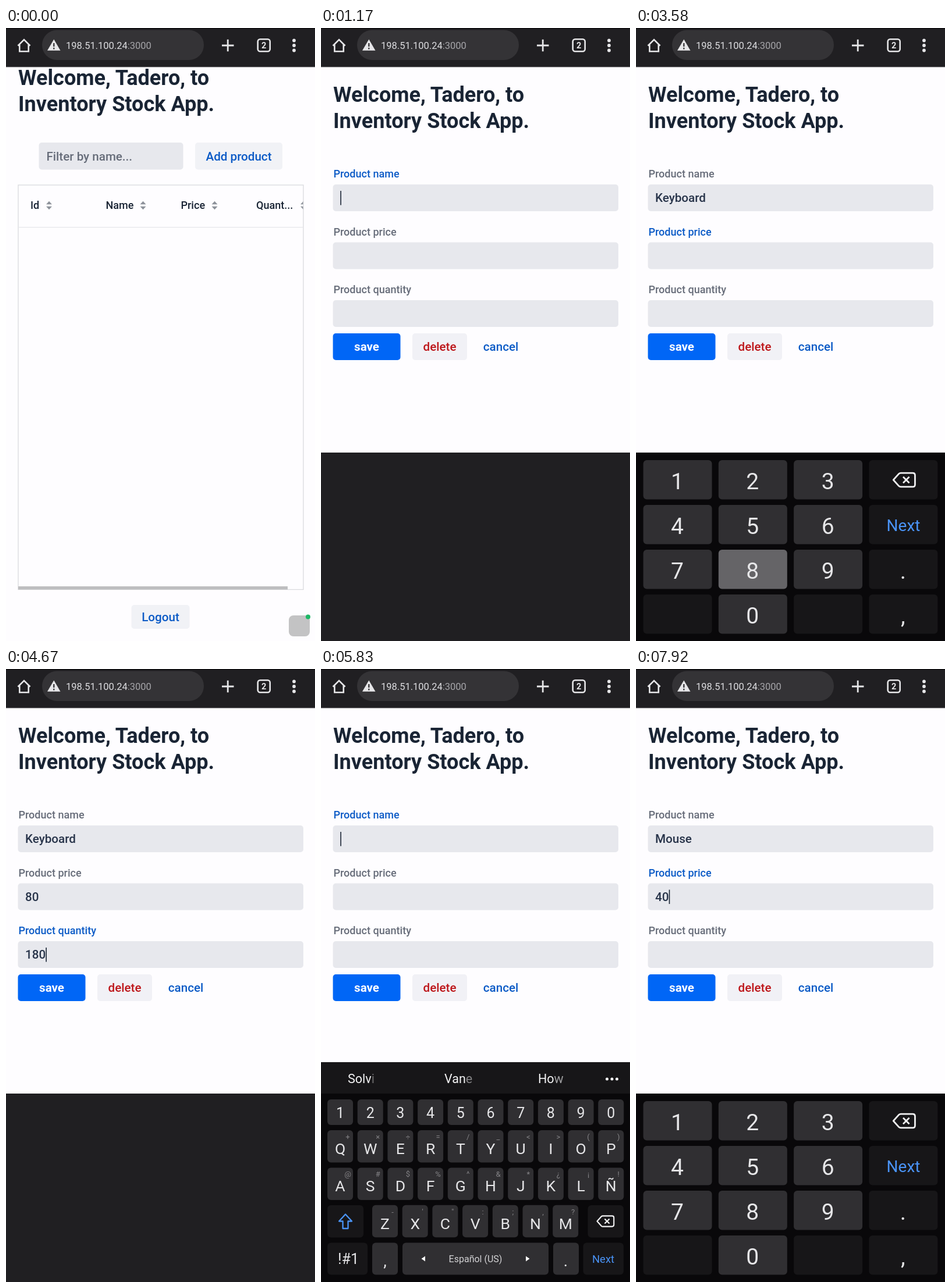
Animation of 531x1054 px, one loop 8000 ms. Source, as an HTML page:

```html
<!DOCTYPE html>
<html lang="en">
<head>
<meta charset="utf-8">
<title>Inventory Stock App</title>
<style>
html, body { margin: 0; width: 100%; height: 100%; overflow: hidden; background: #201f22; }
svg { display: block; width: 100vw; height: 100vh; font-family: Roboto, sans-serif; }
text { white-space: pre; }
</style>
</head>
<body>
<svg id="stage" viewBox="0 0 531 1054" preserveAspectRatio="none"></svg>
<script>
const LOOP = 8000;
const stage = document.getElementById('stage');
const INK = '#192434', BODY = '#28344a', MUTED = '#666c79', BLUE = '#0b5ac6';
const KEY = '#302f32', DARK = '#171618', DOWN = '#656467', BED = '#09080a', LIGHT = '#e6e6e8', LINK = '#4a94f8';

function add(parent, tag, attrs = {}, content) {
  const node = document.createElementNS('http://www.w3.org/2000/svg', tag);
  for (const name in attrs) node.setAttribute(name, attrs[name]);
  if (content !== undefined) node.textContent = content;
  parent.appendChild(node);
  return node;
}
const group = (parent, attrs) => add(parent, 'g', attrs);
const rect = (p, x, y, width, height, fill, rx = 0) => add(p, 'rect', { x, y, width, height, fill, rx });
const path = (p, d, attrs) => add(p, 'path', { d, fill: 'none', ...attrs });
const text = (p, x, y, size, fill, str, attrs) => add(p, 'text', { x, y, 'font-size': size, fill, ...attrs }, str);
const centred = (p, x, y, size, fill, str, weight = 400) =>
  text(p, x, y, size, fill, str, { 'text-anchor': 'middle', 'font-weight': weight });
const show = (node, on) => node.setAttribute('display', on ? 'inline' : 'none');
const clamp = v => Math.max(0, Math.min(1, v));

// Page
const page = group(stage);
rect(page, 0, 0, 531, 1054, '#fefdff');

const scroller = group(page);
const heading = (str, y) => text(scroller, 21, y, 36.1, INK, str, { 'font-weight': 700 });
heading('Welcome, Tadero, to', 127);
heading('Inventory Stock App.', 172);

const grid = group(scroller);
rect(grid, 56.5, 226, 248, 46.5, '#e7e8ed', 5);
text(grid, 69.5, 257, 20.6, MUTED, 'Filter by name...', { 'font-weight': 500 });
rect(grid, 325, 226, 150, 46.5, '#f1f2f6', 5);
centred(grid, 400, 257, 20.6, BLUE, 'Add product', 500);
add(grid, 'rect', { x: 21, y: 299, width: 490, height: 695.5, fill: 'none', stroke: '#d9dade', 'stroke-width': 1.3 });
rect(grid, 21, 371, 490, 1.3, '#e6e7eb');
const clip = add(add(stage, 'clipPath', { id: 'tableClip' }), 'rect', { x: 21, y: 299, width: 489.5, height: 696 });
const table = group(grid, { 'clip-path': 'url(#tableClip)' });
const columns = [42, 171.5, 300.5, 430];
['Id', 'Name', 'Price', 'Quant...'].forEach((title, i) => {
  text(table, columns[i], 340, 18.05, INK, title, { 'font-weight': 500 });
  const x = [74, 235.5, 358.5, 511][i];
  path(table, `M${x - 5} 332.3l5-5.5 5 5.5zM${x - 5} 335.7l5 5.5 5-5.5z`, { fill: '#8d929a' });
});
const row = group(table);
['73', 'Keyboard', '80', '180'].forEach((v, i) => text(row, columns[i], 401.5, 20.6, BODY, v));
rect(grid, 21, 989, 463, 5.5, '#bebec0');
rect(grid, 215.5, 1021, 100, 41, '#f1f2f6', 5);
centred(grid, 265.5, 1048.5, 20.6, BLUE, 'Logout', 500);

const badge = group(page);
rect(badge, 486, 1010, 36, 36, '#c3c3c4', 8);
add(badge, 'circle', { cx: 519, cy: 1012.5, r: 4, fill: '#1eb866' });

const form = group(scroller);
const fields = ['name', 'price', 'quantity'].map((id, i) => {
  const y = 269 + i * 99.5;
  const label = text(form, 21.5, y - 12, 18.05, MUTED, 'Product ' + id, { 'font-weight': 500 });
  rect(form, 20.5, y, 490.5, 46, '#e7e8ed', 5);
  const value = text(form, 33, y + 30.3, 20.6, BODY, '', { 'font-weight': 500 });
  return { id, y, label, value };
});
const underline = rect(form, 33.5, 302.5, 0, 1.3, BODY);
const caret = rect(form, 33, 280, 1.6, 24.5, INK);
rect(form, 20.5, 525, 116, 46, '#0066f6', 5);
centred(form, 78.5, 555, 20.6, '#fff', 'save', 700);
rect(form, 157, 525, 94, 46, '#f1f1f6', 5);
centred(form, 204, 555, 20.6, '#bd161a', 'delete', 500);
centred(form, 309, 555, 20.6, BLUE, 'cancel', 500);

// Browser bar
rect(stage, 0, 0, 531, 67, '#201f22');
rect(stage, 0, 0, 531, 1.3, '#0b0a0c');
rect(stage, 0, 66, 531, 1.3, '#3b3a3d');
rect(stage, 62, 3.5, 278, 51.5, '#343336', 25.7);
path(stage, 'M20.5 30.5L31 20l10.5 10.5M23.3 28.5V40.3H38.7V28.5', { stroke: LIGHT, 'stroke-width': 2.6 });
path(stage, 'M82.3 19.5L93.5 38.7H71z', { fill: LIGHT });
path(stage, 'M82.3 26v6M82.3 33.8v2.6', { stroke: '#343336', 'stroke-width': 2.3 });
const address = text(stage, 103, 36, 16.5, '#dddde0', '198.51.100.24');
add(address, 'tspan', { fill: '#a6a6aa' }, ':3000');
path(stage, 'M371 30h20.5M381.2 19.8v20.5', { stroke: LIGHT, 'stroke-width': 2.8 });
add(stage, 'rect', { x: 432.7, y: 19.2, width: 21, height: 21, rx: 4, fill: 'none', stroke: LIGHT, 'stroke-width': 2.6 });
centred(stage, 443.2, 35, 14.5, LIGHT, '2', 700);
[21.5, 30, 38.5].forEach(cy => add(stage, 'circle', { cx: 495, cy, r: 2.9, fill: LIGHT }));

// Keyboards
const blank = rect(stage, 0, 730, 531, 324, '#201f22');
const letterBoard = group(stage), numberBoard = group(stage);
const keys = {}, letters = [];

function key(board, id, x, y, w, h, fill) {
  const node = rect(board, x, y, w, h, fill, 6);
  if (id) keys[id] = { node, fill, x, y };
}
function backspace(board, x, y, scale) {
  path(group(board, { transform: `translate(${x} ${y}) scale(${scale})` }),
    'M-14.2 0L-7-8Q-6-9-4.5-9H11Q14-9 14-6V6Q14 9 11 9H-4.5Q-6 9-7 8ZM-1.5-4l8 8M6.500-4l-8 8',
    { stroke: '#f2f2f3', 'stroke-width': 2.1, 'stroke-linejoin': 'round' });
}

rect(letterBoard, 0, 730, 531, 324, BED);
const PITCH = 51.7;
[...'1234567890'].forEach((c, i) => {
  key(letterBoard, '', 11 + i * PITCH, 740, 44, 44, KEY);
  centred(letterBoard, 33 + i * PITCH, 771.5, 25, LIGHT, c);
});
[['qwertyuiop', '+×÷=/_<>()', 11], ['asdfghjklñ', '@#$%^&*¿¡!', 11], ['zxcvbnm', '-\'":;,?', 88]]
  .forEach(([chars, marks, left], r) => [...chars].forEach((c, i) => {
    const x = left + i * PITCH, y = 793 + r * 64.4;
    key(letterBoard, c, x, y, 44, 55.5, KEY);
    letters.push({ c, node: centred(letterBoard, x + 22, y + 41, 26.5, LIGHT, c) });
    centred(letterBoard, x + 35, y + 16, 13, '#858487', marks[i]);
  }));
key(letterBoard, '', 11, 922, 62, 55.5, DARK);
const shift = path(letterBoard, 'M42 937.5L53 949.500H46.500V962H37.500V949.500H31Z',
  { 'stroke-width': 2.3, 'stroke-linejoin': 'round' });
key(letterBoard, '', 458.5, 922, 61.5, 55.5, DARK);
backspace(letterBoard, 489, 949.5, 1.02);
key(letterBoard, '', 11, 986.5, 69, 55, DARK);
centred(letterBoard, 47, 1023, 25, LIGHT, '!#1');
key(letterBoard, '', 88, 986.5, 44, 55, KEY);
centred(letterBoard, 110, 1027, 28, LIGHT, ',');
key(letterBoard, '', 140, 986.5, 251, 55, KEY);
path(letterBoard, 'M179 1009.5v9l-6.500-4.500zM352 1009.5v9l6.500-4.500z', { fill: '#fff' });
centred(letterBoard, 265.5, 1020, 16, '#d2d2d4', 'Español (US)');
key(letterBoard, '', 399, 986.5, 44, 55, KEY);
centred(letterBoard, 420.5, 1027, 28, LIGHT, '.');
key(letterBoard, 'Next', 450.5, 986.5, 69.5, 55, DARK);
centred(letterBoard, 485, 1021, 18.5, LINK, 'Next');

const bar = group(letterBoard);
rect(bar, 0, 676, 531, 54, DARK);
const emptyBand = rect(bar, 0, 693, 531, 27, '#0d0c0e');
const hints = group(bar);
const hintLetters = [['Solvi', 46], ['Vane', 212], ['How', 373]].flatMap(([word, x]) => {
  const line = text(hints, x, 712, 21.5, '#f4f4f5', '');
  return [...word].map((c, k) => ({ k, n: word.length, node: add(line, 'tspan', {}, c) }));
});
[491.5, 500, 508.5].forEach(cx => add(hints, 'circle', { cx, cy: 705, r: 2.5, fill: '#f4f4f5' }));

const popup = group(letterBoard);
rect(popup, -17.5, -73, 79, 65, '#1a191b', 10);
const popupText = centred(popup, 22, -43, 38, '#fff', '', 500);

rect(numberBoard, 0, 730, 531, 324, BED);
['1', '2', '3', 'del', '4', '5', '6', 'Next', '7', '8', '9', '.', '', '0', '', ','].forEach((c, i) => {
  const x = 12.5 + i % 4 * 129.3, y = 743 + Math.floor(i / 4) * 77;
  const digit = /\d/.test(c);
  key(numberBoard, c === 'Next' ? 'NumNext' : c, x, y, 118, 67.5, digit ? KEY : DARK);
  if (c === 'del') backspace(numberBoard, 461, 777, 1.32);
  else if (c === 'Next') centred(numberBoard, 459.5, y + 45, 28, LINK, c);
  else centred(numberBoard, x + 58.5, y + 50, 39, LIGHT, c);
});

// Timeline
const events = [];
const at = (time, change) => events.push({ time, change });
const HOLD = 80;
function press(time, id, change) {
  at(time, { pressed: id });
  at(time + HOLD, { pressed: '', ...change });
}
function type(field, word, times) {
  times.forEach((time, i) => press(time, word[i].toLowerCase(),
    { [field]: word.slice(0, i + 1), caret: true, caps: false, hintStart: 0 }));
}
function openForm(time, boardTime, hintStart) {
  at(time, { view: 'form', focus: 0, name: '', price: '', quantity: '', caret: true });
  at(time + 85, { board: 'blank' });
  at(boardTime, { board: 'letters', caps: true });
  at(hintStart, { bar: true, hintStart });
}
function nextToNumbers(time) {
  press(time, 'Next', { board: 'numbers', bar: false, focus: 1 });
}

at(0, { view: 'grid', rows: 0, board: '', bar: false, hintStart: 0, caps: true, pressed: '',
  name: '', price: '', quantity: '', focus: 0, caret: true });
openForm(1000, 1250, 1330);
type('name', 'Keyboard', [1583, 1750, 1917, 2167, 2250, 2333, 2415, 2583]);
nextToNumbers(2750);
at(3410, { caret: false });
type('price', '80', [3575, 3660]);
press(3915, 'NumNext', { focus: 2 });
type('quantity', '180', [4165, 4330, 4500]);
at(4665, { board: 'blank' });
at(4750, { view: 'grid', rows: 1, board: '' });
openForm(5410, 5580, 5612);
type('name', 'Mouse', [6000, 6250, 6415, 6583, 6750]);
nextToNumbers(7165);
type('price', '40', [7660, 7830]);
events.sort((a, b) => a.time - b.time);

function render(t) {
  const s = {};
  for (const e of events) if (e.time <= t) Object.assign(s, e.change);

  const scroll = 29 * (1 - clamp((t - 80) / 320)) ** 2;
  scroller.setAttribute('transform', `translate(0 ${-scroll})`);
  clip.setAttribute('height', 696);
  show(grid, s.view === 'grid');
  show(badge, s.view === 'grid');
  show(row, s.rows > 0);
  show(form, s.view === 'form');
  show(blank, s.board === 'blank');
  show(letterBoard, s.board === 'letters');
  show(numberBoard, s.board === 'numbers');

  fields.forEach((f, i) => {
    f.value.textContent = s[f.id];
    f.label.setAttribute('fill', s.focus === i ? BLUE : MUTED);
  });
  if (s.view === 'form') {
    const active = fields[s.focus];
    const width = s[active.id] ? active.value.getComputedTextLength() : 0;
    caret.setAttribute('x', 33.2 + width);
    caret.setAttribute('y', active.y + 11);
    underline.setAttribute('width', width);
  }
  show(caret, s.caret);
  show(underline, s.board === 'letters' && s.name);

  for (const id in keys) keys[id].node.setAttribute('fill', id === s.pressed ? DOWN : keys[id].fill);
  for (const { c, node } of letters) node.textContent = s.caps ? c.toUpperCase() : c;
  shift.setAttribute('stroke', s.caps ? LINK : '#f2f2f3');

  const isLetter = /^[a-zñ]$/.test(s.pressed);
  show(popup, isLetter);
  if (isLetter) {
    const { x, y } = keys[s.pressed];
    popup.setAttribute('transform', `translate(${x} ${y})`);
    popupText.textContent = s.caps ? s.pressed.toUpperCase() : s.pressed;
  }

  show(bar, s.bar);
  show(hints, s.hintStart);
  show(emptyBand, !s.hintStart);
  const reveal = (t - s.hintStart) / 250;
  for (const { k, n, node } of hintLetters) node.setAttribute('fill-opacity', clamp(reveal * n - k));
}

const start = performance.now();
function frame() {
  render((performance.now() - start) % LOOP);
  requestAnimationFrame(frame);
}
frame();
</script>
</body>
</html>
```
